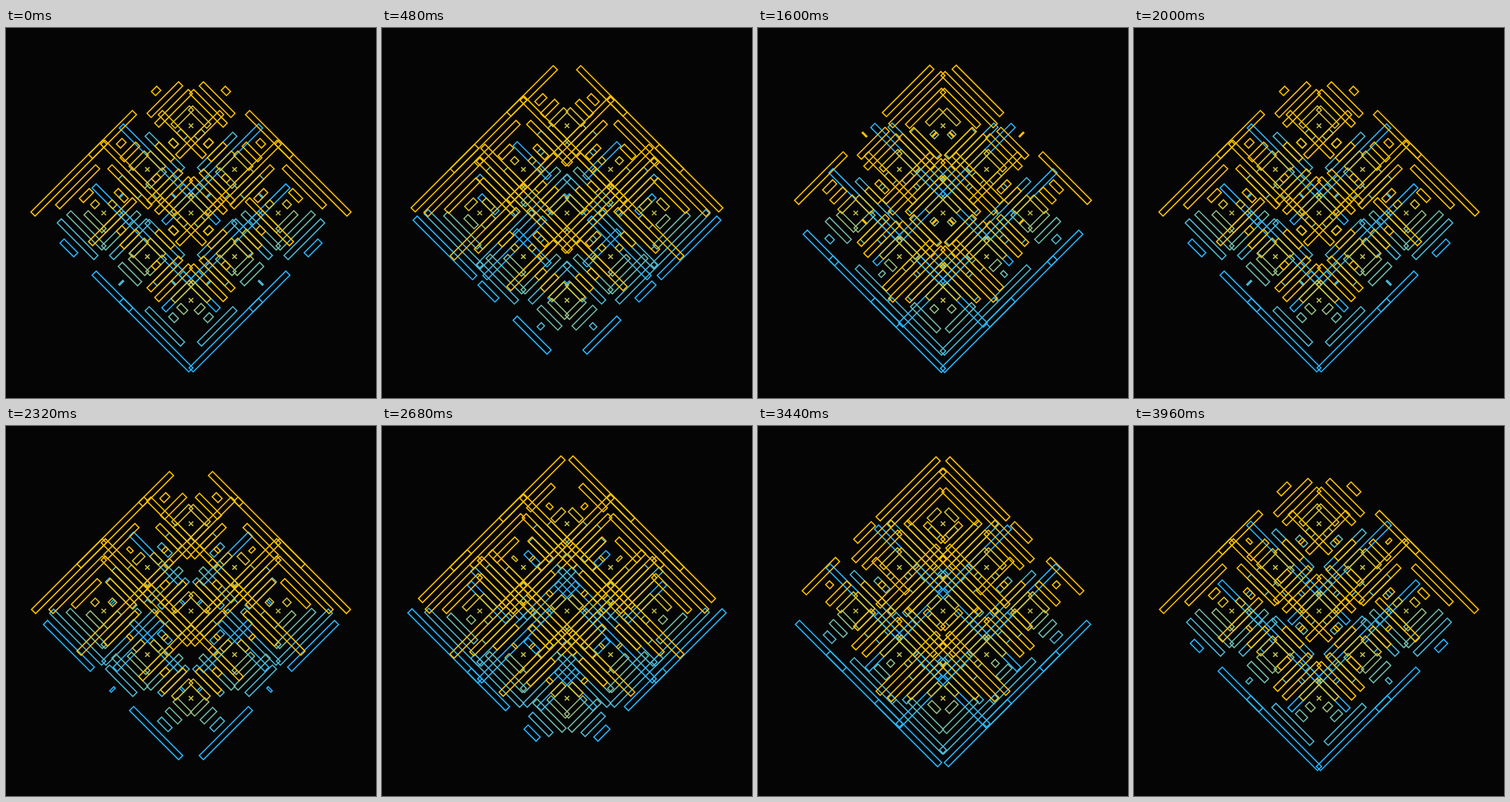
Write an HTML page with a canvas that moves like this. It is 540 px wide and 540 px high and loops after 4000 ms.

```html
<!DOCTYPE html>
<html lang="en">
<head>
<meta charset="utf-8">
<title>Woven bars</title>
<style>
  html, body { margin: 0; width: 100%; height: 100%; overflow: hidden; background: #050505; }
  canvas { display: block; }
</style>
</head>
<body>
<canvas id="stage" width="540" height="540"></canvas>
<script>
const ctx = document.getElementById('stage').getContext('2d');

const PULSE = 2000;        // ms between two vanishing points of a bar
const CELL = 90;           // distance between cell centres
const GAP = 18;            // distance between nested bars
const REACH = 19;          // half length a bar gains per level
const THICKNESS = 8.5;
const BASE_PHASE = 0.292;  // phases are fractions of a pulse
const LEVEL_PHASE = 0.1712;
const COLUMN_PHASE = 0.226;
const BLUE = [41, 182, 255];
const YELLOW = [255, 194, 0];

// Height runs from -4 (lowest bars) to 4 (highest bars).
function colorAt(height) {
  const mix = Math.min(1, (height + 4) / 6);
  return `rgb(${BLUE.map((c, i) => Math.round(c + (YELLOW[i] - c) * mix))})`;
}

function drawBar(x, y, length, vertical) {
  const w = vertical ? THICKNESS : length;
  const h = vertical ? length : THICKNESS;
  ctx.strokeRect(x - w / 2, y - h / 2, w, h);
}

function drawCross(x, y) {
  const arm = 4.6;
  ctx.strokeStyle = colorAt(0.3);
  ctx.beginPath();
  ctx.moveTo(x - arm, y);
  ctx.lineTo(x + arm, y);
  ctx.moveTo(x, y - arm);
  ctx.lineTo(x, y + arm);
  ctx.stroke();
}

function drawCell(col, row, time) {
  const x = col * CELL, y = row * CELL;
  const column = Math.abs(col - row);   // steps away from the upright axis
  for (let height = -4; height <= 4; height++) {
    if (!height) continue;
    const level = Math.abs(height);
    const phase = time / PULSE + BASE_PHASE + height * LEVEL_PHASE + column * COLUMN_PHASE;
    const length = 2 * REACH * level * Math.abs(Math.sin(Math.PI * phase));
    ctx.strokeStyle = colorAt(height);
    drawBar(x - height * GAP, y, length, true);
    drawBar(x, y - height * GAP, length, false);
  }
  drawCross(x, y);
}

function draw(now) {
  const time = now % (2 * PULSE);
  ctx.setTransform(1, 0, 0, 1, 0, 0);
  ctx.fillStyle = '#050505';
  ctx.fillRect(0, 0, 540, 540);
  ctx.translate(270, 270);
  ctx.rotate(Math.PI / 4);
  ctx.lineWidth = 1.7;
  for (let row = -1; row <= 1; row++) {
    for (let col = -1; col <= 1; col++) drawCell(col, row, time);
  }
}

const start = performance.now();
function tick() {
  draw(performance.now() - start);
  requestAnimationFrame(tick);
}
tick();
</script>
</body>
</html>
```
